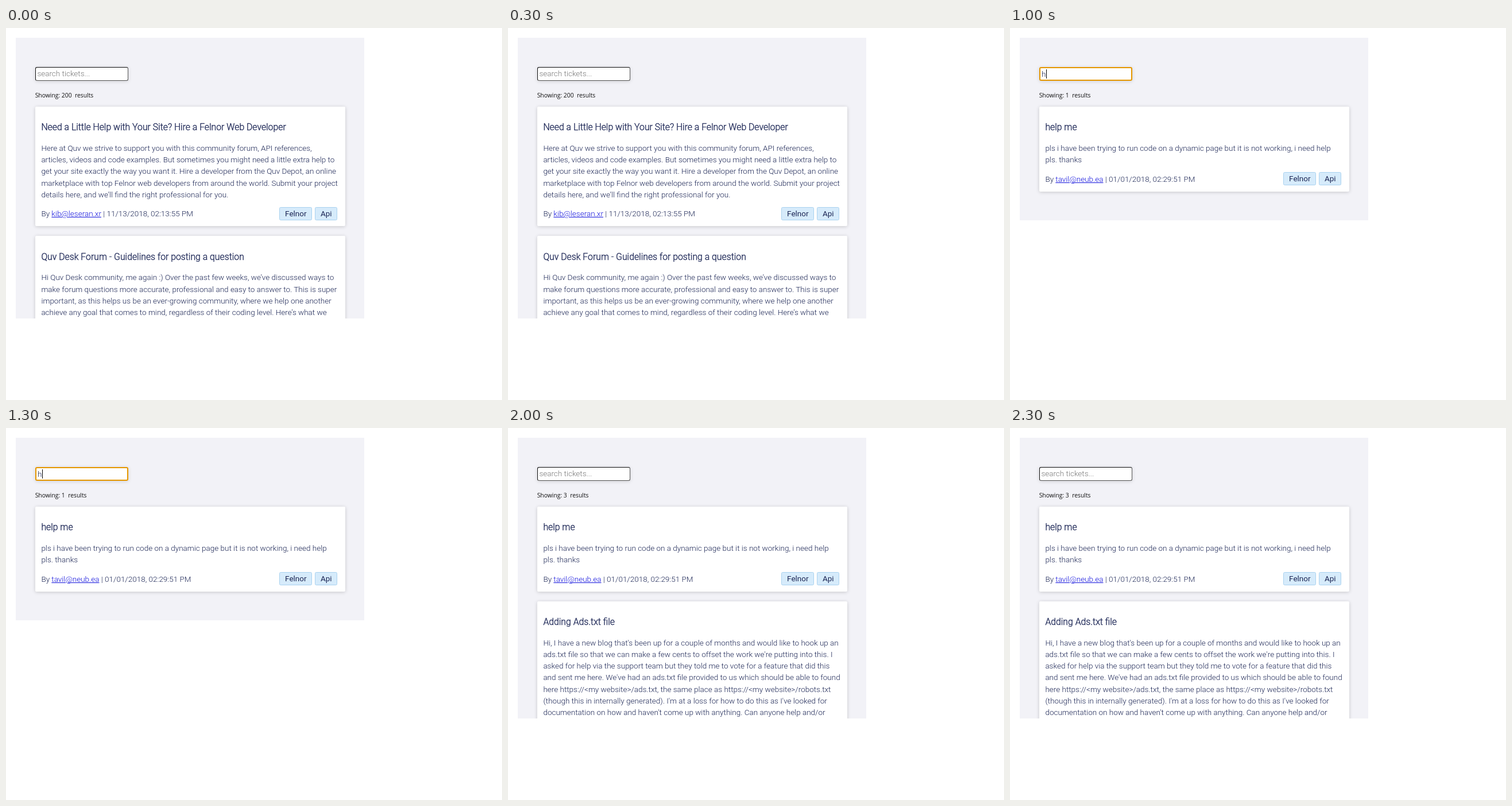
Write an HTML page that moves like this. It is 864x648 px and loops after 2500 ms.

```html
<!DOCTYPE html>
<html lang="en">
<head>
<meta charset="utf-8">
<title>Ticket search</title>
<style>
html, body { margin: 0; width: 100%; height: 100%; overflow: hidden; background: #fff; }
body { position: relative; font: 300 13.5px/20.25px Roboto, sans-serif; color: #1d2756; white-space: pre; }
#panel { position: absolute; left: 17px; top: 17px; width: 607px; overflow: hidden; background: #f2f2f7; }
#search {
  position: absolute; left: 34px; top: 51px; width: 161.5px; height: 24px; box-sizing: border-box;
  padding-left: 2.4px; line-height: 20.5px; color: #757575; background: #fff;
  border: 1.7px solid; border-color: #111 #555 #555 #111; border-radius: 3px;
  box-shadow: 0 1px 6px rgba(0, 0, 0, .15);
}
#search.focus { border: 2px solid #e59700; padding-left: 2px; line-height: 20px; color: #1d2756; }
#search.focus::after {
  content: ""; position: absolute; left: 9.5px; top: 2px; width: 1px; height: 16px; background: #000;
}
#count { position: absolute; left: 33.7px; top: 90px; font: 10.35px/20px "Open Sans", sans-serif; color: #111; }
#count i { position: absolute; left: 93.3px; top: 0; font-size: 10.75px; }
#count span { color: #556cb5; }
#list { position: absolute; left: 33.7px; top: 119.9px; width: 540px; }
.card {
  position: relative; box-sizing: border-box; margin-bottom: 16.9px; padding: 26.4px 10.7px 11.7px;
  background: #fff; border-radius: 2px; box-shadow: 0 1px 6px rgba(0, 0, 0, .18);
}
h3 { margin: 0 0 15.4px; font: 300 15.8px/20.25px Roboto, sans-serif; -webkit-text-stroke: .35px; }
.meta { margin-top: 13.3px; }
.meta u { color: #1414dd; }
.tags { position: absolute; right: 13.4px; bottom: 10.3px; display: flex; gap: 5px; }
.tags b {
  padding: 0 8.7px; font-weight: 400; line-height: 21.2px;
  background: #d6ebfb; border: 1px solid #a9d2ef; border-radius: 2.5px;
}
.hide { position: absolute; right: 8.4px; top: 10.5px; font-weight: 400; }
</style>
</head>
<body>
<div id="panel">
  <div id="search"></div>
  <div id="count"></div>
  <div id="list"></div>
</div>
<script>
const STEP = 500;

const hire = {
  title: "Need a Little Help with Your Site? Hire a Felnor Web Developer",
  text: `Here at Quv we strive to support you with this community forum, API references,
articles, videos and code examples. But sometimes you might need a little extra help to
get your site exactly the way you want it. Hire a developer from the Quv Depot, an online
marketplace with top Felnor web developers from around the world. Submit your project
details here, and we’ll find the right professional for you.`,
  mail: "kib@leseran.xr", date: "11/13/2018, 02:13:55 PM"
};
const rules = {
  title: "Quv Desk Forum - Guidelines for posting a question",
  text: `Hi Quv Desk community, me again :) Over the past few weeks, we’ve discussed ways to
make forum questions more accurate, professional and easy to answer to. This is super
important, as this helps us be an ever-growing community, where we help one another
achieve any goal that comes to mind, regardless of their coding level. Here’s what we`
};
const help = {
  title: "help me",
  text: `pls i have been trying to run code on a dynamic page but it is not working, i need help
pls. thanks`,
  mail: "tavil@neub.ea", date: "01/01/2018, 02:29:51 PM"
};
const ads = {
  title: "Adding Ads.txt file",
  text: `Hi, I have a new blog that's been up for a couple of months and would like to hook up an
ads.txt file so that we can make a few cents to offset the work we're putting into this. I
asked for help via the support team but they told me to vote for a feature that did this
and sent me here. We've had an ads.txt file provided to us which should be able to found
here https://<my website>/ads.txt, the same place as https://<my website>/robots.txt
(though this in internally generated). I'm at a loss for how to do this as I've looked for
documentation on how and haven't come up with anything. Can anyone help and/or`
};
const notify = {
  title: "Notifications not working",
  hide: true,
  text: `Hi I was working with quv crm backend notificatication and just stoped working. See the
code bellow CRM Backend code import quvCrm from 'quv-crm-backend'; export function
notifySiteContributors(body, titulo, acao, url) { quvCrm.notifications.notify( body,
["Mobile", "Browser", "Dashboard"], { "title": titulo, "actionTitle": acao, "actionTarget": { "url":
url }, "recipients": { "role": "All_Contributors" } }) } frontend code import {
notifySiteContributors } from 'backend/CRM'; export function botaofinalizar_click(event)
{ let itemObj = $w("#dataset3").getCurrentItem(); let os = itemObj.title.replace('/', '%2F')
let link = 'www.otimicar.com/respostas-cotacao-pecas-/' + os $w('#text217').show()
notifySiteContributors( String('OS ' + $w('#osText').text + ' ' + $w('#text207').text + ' ' +
$w('#text208').text + ' ' + $w('#text214').text), String('Cotação de peça respondida por ' +
$w('#text223').text), 'VEJA AGORA A RESPOSTA', link) } The error => Unhandled rejection
Error: server responded with 400 - {"message":"","details":{}} at handleServerError
(/dynamic-modules/edm_root/2b595510-de9c-11e9-aaa2-
279ac5c14f62/node_modules/@quv/quv-crm-backend/src/notifications/api.ts:162:11)
at Object.<anonymous> (/dynamic-modules/edm_root/2b595510-de9c-11e9-aaa2-`
};

const three = { count: 3, cards: [help, ads] };
const scenes = [
  { count: 200, cards: [hire, rules] },
  three,
  { count: 1, cards: [help], query: "h", height: 318 },
  { count: 1, cards: [notify], note: "<i>(2 hidden tickets - <span>restore</span>)</i>" },
  three
];

const $ = id => document.getElementById(id);
const escape = s => s.replace(/&/g, "&amp;").replace(/</g, "&lt;");

const footer = c => c.mail
  ? `<div class="meta">By <u>${c.mail}</u> | ${c.date}</div><div class="tags"><b>Felnor</b><b>Api</b></div>`
  : `<div class="meta"> </div>`;

const card = c => `<div class="card">${c.hide ? '<div class="hide">Hide</div>' : ""}` +
  `<h3>${c.title}</h3><div>${escape(c.text)}</div>${footer(c)}</div>`;

function show({ count, cards, query, note = "", height = 489 }) {
  $("panel").style.height = height + "px";
  $("search").className = query ? "focus" : "";
  $("search").textContent = query || "search tickets...";
  $("count").innerHTML = `Showing: ${count}  results${note}`;
  $("list").innerHTML = cards.map(card).join("");
}

let current;
function tick() {
  const scene = scenes[Math.floor(performance.now() / STEP) % scenes.length];
  if (scene !== current) show(current = scene);
  requestAnimationFrame(tick);
}
tick();
</script>
</body>
</html>
```
